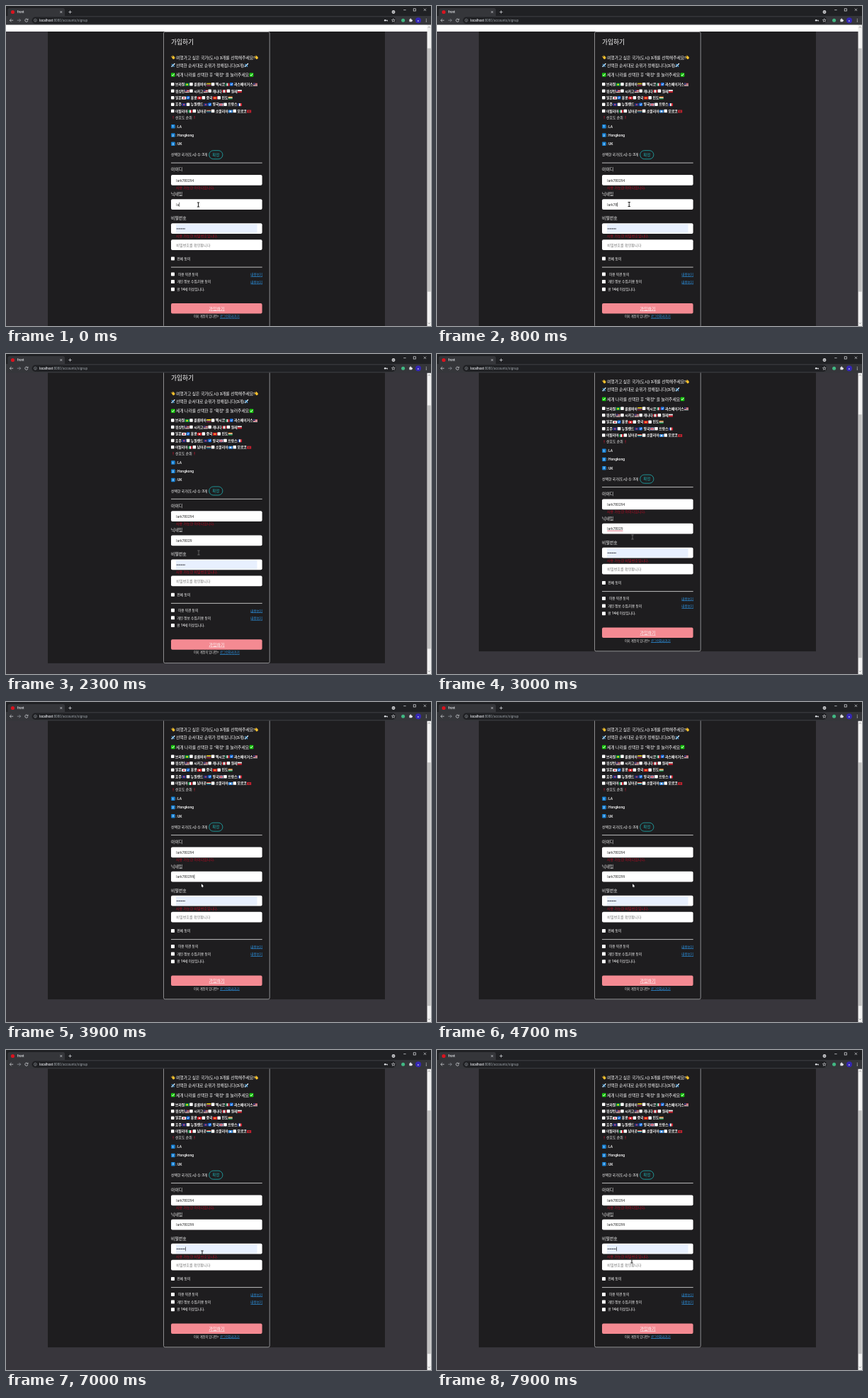
Animation of 600 by 451 pixels, one loop 8 s. Source, as an HTML page with a canvas:

```html
<!DOCTYPE html>
<html lang="ko">
<head>
<meta charset="utf-8">
<title>front</title>
<style>
html, body { margin: 0; width: 100%; height: 100%; overflow: hidden; background: #38363c; }
canvas { display: block; }
</style>
</head>
<body>
<canvas id="stage" width="600" height="451"></canvas>
<script>
const ctx = document.getElementById('stage').getContext('2d');
const LOOP = 8000;
const FONT = 'Roboto, "Noto Sans CJK KR", "Noto Sans CJK JP", sans-serif';
const USER_ID = 'lark780294';
const NICK = 'lark780299';
const FIELDS = [238, 272.2, 306.3, 329.2];
const FIELD_H = 14.7;

// name, flag kind, flag colours, checked
const cities = [
  [['브라질', 'disc', '#0a9b45 #f5d80a'], ['콜롬비아', 'rows', '#f6cf17 #f6cf17 #1d3b8f #c8202f'],
   ['멕시코', 'cols', '#0b7a4b #eeeeee #c8202f'], ['라스베이거스', 'canton', '#c83040 #eeeeee #2f3f80', true]],
  [['워싱턴', 'canton', '#c83040 #eeeeee #2f3f80'], ['시카고', 'canton', '#c83040 #eeeeee #2f3f80'],
   ['캐나다', 'cols', '#d8202f #f2f2f2 #f2f2f2 #d8202f'], ['칠레', 'rows', '#eeeeee #d0202f']],
  [['일본', 'disc', '#f2f2f2 #c82038'], ['홍콩', 'disc', '#dc2028 #f4d0d0', true],
   ['중국', 'disc', '#dc2028 #f0b030'], ['인도', 'rows', '#f09a3a #eeeeee #1a8a3a']],
  [['호주', 'disc', '#20308a #c05070'], ['뉴질랜드', 'disc', '#20307a #b04868'],
   ['영국', 'cross', '#2a3a85 #eeeeee #cf2036', true], ['프랑스', 'cols', '#24409a #f2f2f2 #d82a38']],
  [['이탈리아', 'cols', '#158a48 #f2f2f2 #cf2a38'], ['남아공', 'rows', '#cf3a2f #eeeeee #128a5a #2a3a85'],
   ['소말리아', 'disc', '#3f8fe0 #e8f0ff'], ['모로코', 'disc', '#c02030 #5a3020']]
];

function rect(x, y, w, h, color) {
  ctx.fillStyle = color;
  ctx.fillRect(x, y, w, h);
}

function round(x, y, w, h, r, fill, stroke) {
  ctx.beginPath();
  ctx.roundRect(x, y, w, h, r);
  if (fill) { ctx.fillStyle = fill; ctx.fill(); }
  if (stroke) { ctx.strokeStyle = stroke; ctx.lineWidth = 0.8; ctx.stroke(); }
}

function disc(x, y, r, color) {
  ctx.beginPath();
  ctx.arc(x, y, r, 0, Math.PI * 2);
  ctx.fillStyle = color;
  ctx.fill();
}

function line(points, color, width = 0.7) {
  ctx.beginPath();
  for (let i = 0; i < points.length; i += 2) ctx.lineTo(points[i], points[i + 1]);
  ctx.strokeStyle = color;
  ctx.lineWidth = width;
  ctx.stroke();
}

function arc(x, y, r, from, to, color, width = 0.7) {
  ctx.beginPath();
  ctx.arc(x, y, r, from, to);
  ctx.strokeStyle = color;
  ctx.lineWidth = width;
  ctx.stroke();
}

// y is the visual middle of the line; returns the right edge
function text(str, x, y, size, color = '#ffffff', weight = 500) {
  ctx.font = `${weight} ${size}px ${FONT}`;
  ctx.fillStyle = color;
  ctx.fillText(str, x, y + size * 0.37);
  return x + ctx.measureText(str).width;
}

function link(str, x, y, size, color) {
  const end = text(str, x, y, size, color);
  rect(x, y + size * 0.52, end - x, 0.6, color);
}

function checkbox(x, y, size, on) {
  round(x, y - size / 2, size, size, 0.7, on ? '#1a73e8' : '#ffffff');
  if (on) line([x + 0.9, y, x + 1.9, y + 1.1, x + 3.7, y - 1.2], '#fff', 0.8);
}

function flag(x, y, kind, colors) {
  const c = colors.split(' ');
  const w = 6, h = 4, top = y - h / 2;
  if (kind === 'rows') c.forEach((v, i) => rect(x, top + i * h / c.length, w, h / c.length, v));
  if (kind === 'cols') c.forEach((v, i) => rect(x + i * w / c.length, top, w / c.length, h, v));
  if (kind === 'disc') { rect(x, top, w, h, c[0]); disc(x + 3, y, 1.2, c[1]); }
  if (kind === 'canton') {
    for (let i = 0; i < 4; i++) rect(x, top + i, w, 1, c[i % 2]);
    rect(x, top, 2.8, 2, c[2]);
  }
  if (kind === 'cross') {
    rect(x, top, w, h, c[0]);
    line([x, top, x + w, top + h], c[1], 0.8);
    line([x, top + h, x + w, top], c[1], 0.8);
    rect(x, y - 0.8, w, 1.6, c[1]);
    rect(x + 2.2, top, 1.6, h, c[1]);
    rect(x, y - 0.4, w, 0.8, c[2]);
    rect(x + 2.6, top, 0.8, h, c[2]);
  }
}

function hands(x, y) {
  ctx.save();
  ctx.translate(x + 3, y);
  ctx.rotate(-0.6);
  round(-1.7, -1.4, 3.6, 3.8, 1.3, '#f5c02e');
  for (let i = 0; i < 3; i++) line([-1.2 + i * 1.3, -0.5, -1.5 + i * 1.3, -2.6], '#f5c02e', 0.9);
  ctx.restore();
}

function plane(x, y) {
  line([x + 0.6, y + 2.3, x + 5.4, y - 2.4], '#e6f1fa', 1.4);
  line([x + 0.8, y - 1.5, x + 3.3, y - 0.3, x + 4.3, y + 2.3], '#48a5e8', 1.2);
  line([x + 0.4, y + 0.9, x + 2, y + 2.6], '#48a5e8', 0.8);
}

function greenCheck(x, y) {
  round(x, y - 2.8, 5.6, 5.6, 0.8, '#16c60c');
  line([x + 1.2, y, x + 2.4, y + 1.4, x + 4.5, y - 1.6], '#fff', 0.9);
}

function bang(x, y) {
  rect(x, y - 2.1, 0.9, 2.8, '#b5142c');
  rect(x, y + 1.2, 0.9, 0.9, '#b5142c');
}

function caret(x, y) {
  rect(x + 0.3, y - 3, 0.6, 6, '#222');
}

const blink = (t, start) => t >= start && (t - start) % 1060 < 530;

function nickText(t) {
  if (t >= 3700) return NICK;
  return NICK.slice(0, Math.min(9, 2 + Math.floor(t / 190)));
}

function scrollAt(t) {
  const ease = (a) => {
    const p = Math.min(1, Math.max(0, (t - a) / 130));
    return p * p * (3 - 2 * p);
  };
  return 16.75 * (ease(2050) + ease(2480));
}

function drawForm(t) {
  rect(59, 36, 476, 416.6, '#1e1d1f');
  round(222.5, 36.5, 149.7, 415.8, 2, null, '#a9a9ab');

  text('가입하기', 233, 51, 8.7, '#ffffff', 400);
  hands(233, 72.5);
  hands(350.5, 72.5);
  text('여행가고 싶은 국가(도시) 3개를 선택해주세요!', 240, 72.5, 5.8);
  plane(233, 83.5);
  plane(336.5, 83.5);
  text('선택한 순서대로 순위가 정해집니다(3개)', 240, 83.5, 5.75);
  greenCheck(233, 97);
  greenCheck(343.7, 97);
  text('세개 나라를 선택한 후 "확정" 을 눌러주세요', 240, 97, 5.8);

  cities.forEach((row, i) => {
    const y = 110.3 + i * 9.45;
    let x = 233;
    for (const [name, kind, colors, on] of row) {
      checkbox(x, y, 4.5, on);
      const end = text(name, x + 6, y, 4.8, '#ffffff', 700);
      flag(end + 0.4, y + 0.4, kind, colors);
      x = end + 7;
    }
  });

  bang(235.6, 157);
  text('선호도 순위', 239, 157, 4.9);
  bang(265.6, 157);
  ['LA', 'Hongkong', 'UK'].forEach((city, i) => {
    const y = 169.7 + i * 12.3;
    round(233.2, y - 2.7, 5.4, 5.4, 0.7, '#1683d8');
    text(String(i + 1), 234.6, y, 4.2, '#d5ebff', 700);
    text(': ' + city, 239.4, y, 5);
  });

  text('선택한 국가(도시) 수: 3개', 233, 209.5, 4.85);
  round(286.7, 203.7, 19.2, 12, 6, null, '#1fb0b2');
  text('확정', 291.2, 209.7, 5.5, '#1fb0b2');
  rect(233, 220.6, 128.7, 1, '#bdbdbd');

  text('아이디', 233, 230.3, 5.9);
  text('닉네임', 233, 265, 5.9);
  text('비밀번호', 233, 299, 5.9);
  const red = '#b00a22';
  text('사용 가능한 아이디입니다.', 240, 255.7, 5, red);
  text('사용 가능한 비밀번호입니다.', 240, 324.2, 5, red);
  FIELDS.forEach(y => round(233, y, 128.6, FIELD_H, 2, '#ffffff'));

  text(USER_ID, 240.3, 245.7, 5, '#333', 400);
  const nick = nickText(t);
  const end = text(nick, 240.3, 279.8, 5, '#333', 400);
  if (t < 1330 || (t < 3700 && blink(t, 1330)) || (t < 4200 && blink(t, 3700))) caret(end, 279.8);
  if (t >= 2700 && t < 3700) rect(240.3, 282.3, end - 240.3, 0.7, '#e0405a');

  rect(240, 307.3, 114.5, 12.8, '#e8f0fe');
  for (let i = 0; i < 8; i++) disc(241.2 + i * 1.58, 313.9, 0.65, '#2a2a30');
  if (blink(t, 5600)) caret(253, 313.9);
  text('비밀번호를 확인합니다', 240.3, 336.8, 5.1, '#757575', 400);

  checkbox(233, 356, 5, false);
  text('전체 동의', 241.5, 356, 4.75);
  rect(233, 367.6, 128.7, 1, '#bdbdbd');
  const terms = [['이용 약관 동의', 243], ['개인 정보 수집,이용 동의', 241.5], ['만 14세 이상입니다.', 241.5]];
  terms.forEach(([label, x], i) => {
    const y = 378 + i * 10.6;
    checkbox(233, y, 5, false);
    text(label, x, y, 4.7);
    if (i < 2) link('내용보기', 345.3, y + 0.6, 4.55, '#2d9bf0');
  });

  round(233, 419.1, 128.6, 14.5, 2, '#f48a92');
  link('가입하기', 286.5, 426.3, 6, '#ffffff');
  text('이미 계정이 있다면?', 265, 437.6, 4.2, '#dedede');
  link('로그인하러가기', 302, 437.6, 4.3, '#2d9bf0');
}

function drawScrollbar(s) {
  rect(594.5, 26.5, 5.5, 425, '#f1f1f1');
  rect(595, 59.6 + s * 0.765, 4.6, 343, '#c1c1c1');
  line([596, 30.5, 597.3, 29.2, 598.6, 30.5], '#666', 0.7);
  line([596, 446.5, 597.3, 447.8, 598.6, 446.5], '#666', 0.7);
}

function drawBrowser() {
  const light = '#dfe1e5', dim = '#9aa0a6';
  rect(0, 0, 600, 14.5, '#202124');
  rect(0, 14, 600, 12.5, '#35363a');
  round(2.5, 3, 80.5, 13, [2.5, 2.5, 0, 0], '#35363a');
  disc(9.5, 8.5, 2.6, '#d8141f');
  text('front', 15.8, 8.5, 4.5, light);
  line([76.4, 7.1, 79.2, 9.9], light);
  line([79.2, 7.1, 76.4, 9.9], light);
  line([88.3, 8.5, 92.7, 8.5], light);
  line([90.5, 6.3, 90.5, 10.7], light);

  disc(547, 8.5, 2.4, '#c8c9cc');
  line([545.9, 8, 547, 9.1, 548.1, 8], '#202124', 0.6);
  line([561.2, 5.6, 564.6, 5.6], light);
  ctx.strokeRect(575.2, 3.8, 3.2, 3.2);
  line([589.8, 3.7, 593, 6.9], light);
  line([593, 3.7, 589.8, 6.9], light);

  line([10.2, 20.2, 5.4, 20.2], light);
  line([7.5, 18, 5.3, 20.2, 7.5, 22.4], light);
  line([15.8, 20.2, 20.6, 20.2], dim);
  line([18.5, 18, 20.7, 20.2, 18.5, 22.4], dim);
  arc(28.9, 20.2, 2.1, 0.3, 5.4, light);
  line([31, 17.8, 31, 19.6, 29.3, 19.6], light);

  round(36.5, 15.6, 514, 9.4, 4.7, '#202124');
  arc(41.4, 20.2, 1.9, 0, Math.PI * 2, dim, 0.6);
  rect(41.1, 19.9, 0.6, 1.4, dim);
  const end = text('localhost', 47, 20.2, 4.7, light);
  text(':8080/accounts/signup', end, 20.2, 4.7, dim, 400);

  disc(535.2, 20.2, 1.3, light);
  rect(536, 19.8, 3, 0.9, light);
  rect(537.7, 20.2, 0.9, 1.4, light);
  ctx.beginPath();
  for (let i = 0; i < 10; i++) {
    const a = i * Math.PI / 5 - Math.PI / 2, r = i % 2 ? 1.1 : 2.5;
    ctx.lineTo(546.8 + r * Math.cos(a), 20.3 + r * Math.sin(a));
  }
  ctx.closePath();
  ctx.strokeStyle = light;
  ctx.lineWidth = 0.6;
  ctx.stroke();

  disc(560.6, 20.2, 2.5, '#41b883');
  round(569.4, 18.7, 3.6, 3.6, 0.5, light);
  disc(571.2, 18.4, 0.9, light);
  disc(573.2, 20.5, 0.9, light);
  disc(582, 20.2, 4, '#3527b5');
  text('c', 580.8, 19.9, 4.4, '#fff');
  for (let i = -1; i < 2; i++) disc(593.3, 20.2 + i * 1.7, 0.55, light);
}

// time, x, y
const path = [
  [0, 271.5, 280], [1600, 271, 279], [2300, 272, 280], [2700, 274, 268], [3000, 276, 258],
  [4900, 276.5, 258], [5500, 278, 285], [6100, 278.3, 285.5], [7000, 277, 286], [7700, 275, 297], [8000, 275, 297]
];

function pointerAt(t) {
  const i = path.findIndex((p, n) => n > 0 && t <= p[0]);
  const [a, b] = [path[i - 1], path[i]];
  let p = (t - a[0]) / (b[0] - a[0]);
  p = p * p * (3 - 2 * p);
  return [a[1] + (b[1] - a[1]) * p, a[2] + (b[2] - a[2]) * p];
}

function drawPointer(t, s) {
  const [x, y] = pointerAt(t);
  if (t > 3400 && t < 5200) {
    ctx.beginPath();
    [[0, 0], [0, 4.6], [1, 3.7], [1.7, 5.1], [2.4, 4.8], [1.8, 3.4], [3.1, 3.3]]
      .forEach(([dx, dy]) => ctx.lineTo(x + dx - 0.3, y + dy - 1.7));
    ctx.closePath();
    ctx.fillStyle = '#fff';
    ctx.fill();
    return;
  }
  const onField = FIELDS.some(f => y > f - s && y < f - s + FIELD_H);
  const color = onField ? '#222' : '#8a8a8c';
  const width = onField ? 1 : 0.6;
  line([x, y - 3, x, y + 3], color, width);
  line([x - 1.7, y - 3, x + 1.7, y - 3], color, width);
  line([x - 1.7, y + 3, x + 1.7, y + 3], color, width);
}

function draw(now) {
  const t = now % LOOP;
  const s = scrollAt(t);
  rect(0, 0, 600, 451, '#38363c');
  ctx.save();
  ctx.translate(0, -s);
  rect(0, 20, 600, 16, '#ffffff');
  drawForm(t);
  ctx.restore();
  drawScrollbar(s);
  drawBrowser();
  drawPointer(t, s);
  requestAnimationFrame(draw);
}
requestAnimationFrame(draw);
</script>
</body>
</html>
```
